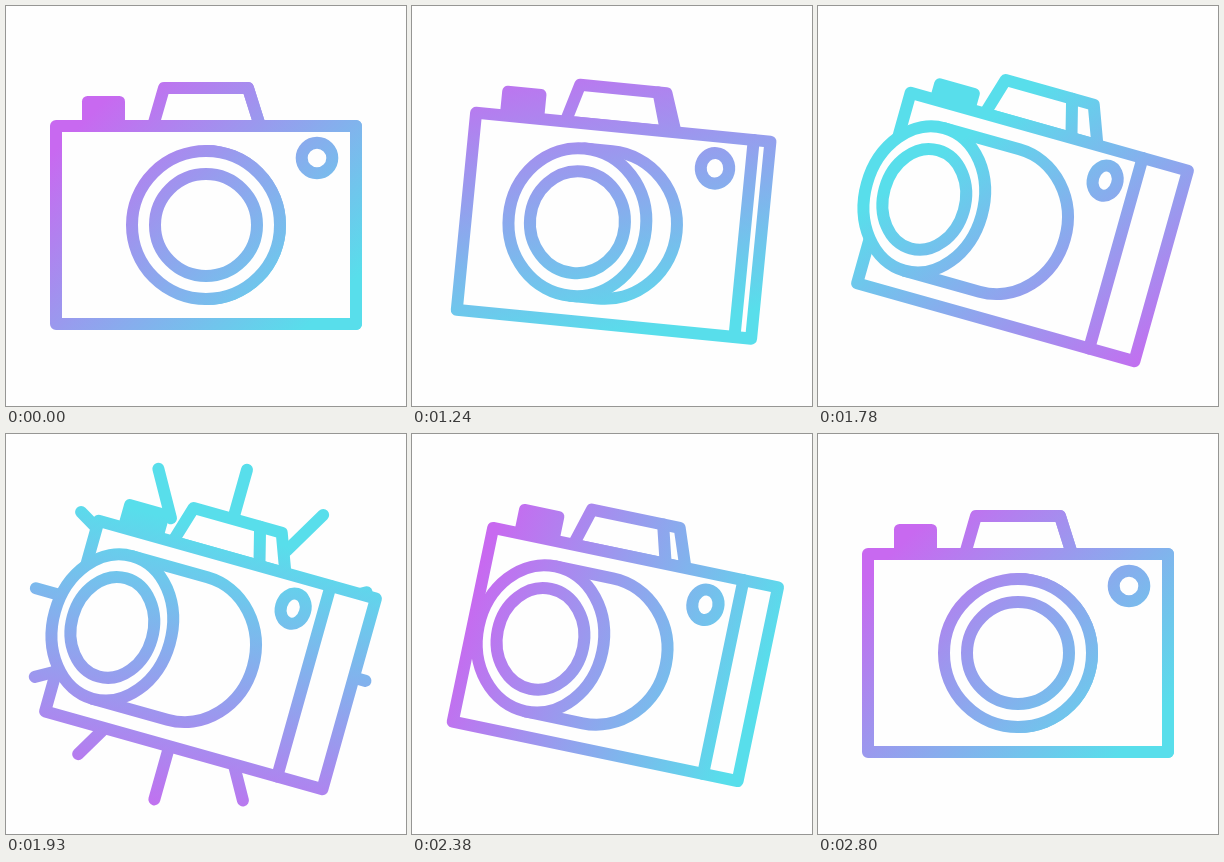
Recreate the animation shown at these times as an HTML page with a canvas. Size 400x400 px, loop 2.83 s.

```html
<!DOCTYPE html>
<html lang="en">
<head>
<meta charset="utf-8">
<title>Camera</title>
<style>
html, body { margin: 0; height: 100%; overflow: hidden; background: #fefefe; }
canvas { display: block; width: 100vw; height: 100vh; }
</style>
</head>
<body>
<canvas id="stage" width="400" height="400"></canvas>
<script>
const ctx = document.getElementById('stage').getContext('2d');
const LOOP = 2830, STEP = 30, HOLD = 1030;
const PAPER = '#fefefe', PURPLE = '#c869f0', CYAN = '#58deeb';
const RAD = Math.PI / 180;

// Keys are [time in ms, value]
const TURN = [[1030, 0], [1420, .79], [1540, .95], [1700, 1], [1900, 1], [2110, .985],
  [2170, .957], [2530, .535], [2635, .28], [2800, 0]];
const SPIN = [[1000, 0], [1420, 76], [1780, 190], [2170, 304], [2530, 350], [2800, 360]];
const SHIFT = [[1000, 8], [1420, 62], [1780, 45], [2170, 5], [2800, 8]];
const PRESS = [[1620, 0], [1780, 8], [1960, 0]];

// Smooth interpolation that never overshoots its keys
function at(keys, t) {
  const last = keys.length - 1;
  if (t <= keys[0][0]) return keys[0][1];
  if (t >= keys[last][0]) return keys[last][1];
  const i = keys.findIndex(k => k[0] > t) - 1;
  const rise = j => (keys[j + 1][1] - keys[j][1]) / (keys[j + 1][0] - keys[j][0]);
  const slope = j => {
    if (j === 0 || j === last) return 0;
    const a = rise(j - 1), b = rise(j);
    return a * b > 0 ? 2 * a * b / (a + b) : 0;
  };
  const span = keys[i + 1][0] - keys[i][0], u = (t - keys[i][0]) / span;
  const ease = u * u * (3 - 2 * u);
  return keys[i][1] + (keys[i + 1][1] - keys[i][1]) * ease
    + span * u * (1 - u) * (slope(i) * (1 - u) - slope(i + 1) * u);
}

function paint(fill) {
  if (fill) {
    ctx.fillStyle = fill;
    ctx.fill();
  }
  ctx.stroke();
}

function poly(points, fill) {
  ctx.beginPath();
  points.forEach(p => ctx.lineTo(...p));
  if (fill) ctx.closePath();
  paint(fill);
}

function oval(x, rx, ry, y = 0) {
  ctx.beginPath();
  ctx.ellipse(x, y, rx, ry, 0, 0, 2 * Math.PI);
  paint(PAPER);
}

function setGradient(t, tilt) {
  const angle = (45 + at(SPIN, t)) * RAD - tilt;
  const dx = Math.cos(angle), dy = Math.sin(angle), s = at(SHIFT, t), half = 152;
  const g = ctx.createLinearGradient(
    -dx * (half + s), -dy * (half + s), dx * (half - s), dy * (half - s));
  g.addColorStop(0, PURPLE);
  g.addColorStop(1, CYAN);
  ctx.strokeStyle = g;
  return g;
}

function drawRays(t) {
  const q = (t - 1830) / 240;
  if (q <= 0 || q >= 1) return;
  const reach = v => 120 + 53 * Math.sin(Math.PI / 2 * Math.min(1, Math.max(0, v)));
  const head = reach(2 * q), tail = reach(2 * q - 1);
  for (let i = 0; i < 12; i++) {
    const c = Math.cos(i * 30 * RAD), s = Math.sin(i * 30 * RAD);
    poly([[c * tail - 15, s * tail - 17], [c * head - 15, s * head - 17]]);
  }
}

function drawLens(p, squash) {
  const base = -24 * p, front = -102 * p, r = 74;
  ctx.beginPath();
  ctx.moveTo(front, -r);
  ctx.lineTo(base, -r);
  ctx.ellipse(base, 0, r - 6 * p, r, 0, -Math.PI / 2, Math.PI / 2);
  ctx.lineTo(front, r);
  paint(PAPER);
  oval(front, r * squash, r);
  oval(front, 51 * squash, 51);
}

function draw(t) {
  const p = at(TURN, t), tilt = 15.7 * RAD * p, squash = 1 - .195 * p;
  ctx.setTransform(1, 0, 0, 1, 0, 0);
  ctx.fillStyle = PAPER;
  ctx.fillRect(0, 0, 400, 400);
  ctx.translate(200 + 4.5 * p, 219 + 2 * p);
  ctx.rotate(tilt);
  ctx.lineWidth = 12;
  ctx.lineCap = ctx.lineJoin = 'round';
  const ink = setGradient(t, tilt);

  drawRays(t);

  // Shutter button
  ctx.fillStyle = ink;
  ctx.beginPath();
  ctx.roundRect(-124, -129 + at(PRESS, t), 43 + 4 * p, 36, 5.5);
  ctx.fill();

  // Flash housing
  poly([[-53 - 14 * p, -99], [-42 - 14 * p, -137], [42 - 6.5 * p, -137], [54 - 4 * p, -99]], PAPER);
  poly([[42 - 29 * p, -137], [54 - 31 * p, -99]]);

  // Body with its side face
  const w = 150 - 6 * p, edge = w - 47 * p;
  poly([[-w, -99], [w, -99], [w, 99], [-w, 99]], PAPER);
  poly([[edge, -99], [edge, 99]]);

  oval(111 - 44 * p, 15.3 * squash, 15.3, -67);
  drawLens(p, squash);
}

function frame(now) {
  const t = now % LOOP;
  draw(t < HOLD ? 0 : HOLD + Math.floor((t - HOLD) / STEP) * STEP);
  requestAnimationFrame(frame);
}
frame(0);
</script>
</body>
</html>
```
